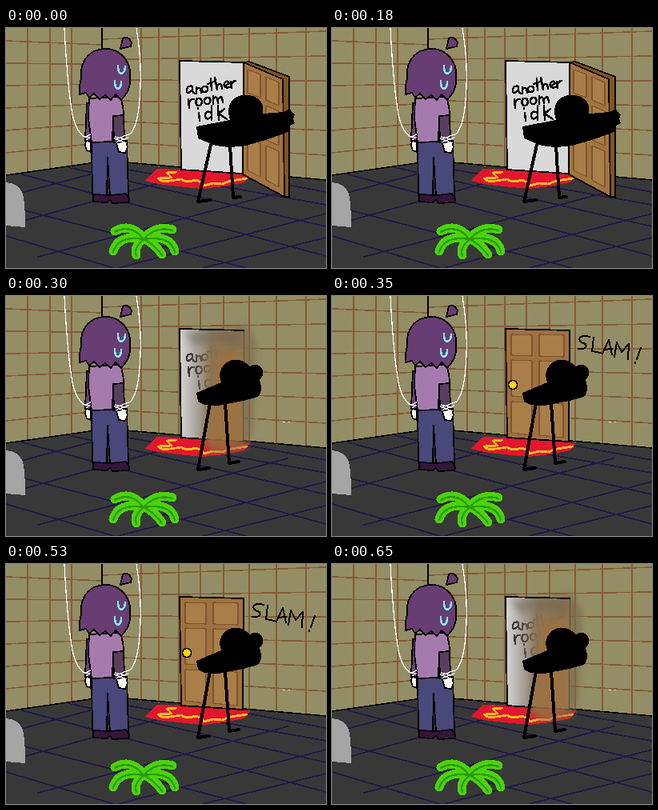
Recreate the animation shown at these times as an HTML page. Size 400 by 300 pixels, loop 700 ms.

```html
<!DOCTYPE html>
<html lang="en">
<head>
<meta charset="utf-8">
<title>Slam</title>
<style>
html, body { margin: 0; width: 100%; height: 100%; overflow: hidden; background: #383838; }
svg { display: block; width: 400px; height: 300px; }
path, ellipse { stroke-linecap: round; stroke-linejoin: round; }
.ink { fill: none; stroke: #000; stroke-width: 2; }
.edge { stroke: #000; stroke-width: 1.8; }
.rope { fill: none; stroke: #fff; stroke-width: 1.3; }
.panel { fill: #a97e49; stroke: #7d552d; stroke-width: 1.2; }
.leg { fill: none; stroke: #000; stroke-width: 4; }
</style>
</head>
<body>
<svg viewBox="0 0 400 300" shape-rendering="crispEdges">
  <defs>
    <linearGradient id="sweep">
      <stop offset="0" stop-color="#8b8780" stop-opacity="0"/>
      <stop offset=".25" stop-color="#817667" stop-opacity=".5"/>
      <stop offset=".5" stop-color="#8a7352" stop-opacity=".9"/>
      <stop offset="1" stop-color="#957348" stop-opacity=".9"/>
    </linearGradient>
    <filter id="soft" x="-30%" y="-30%" width="160%" height="160%"><feGaussianBlur stdDeviation="4"/></filter>
    <g id="words" class="ink" style="stroke-width:2.4" role="img" aria-label="another room idk">
      <path d="M233 73Q226 71 226 79Q227 84 233 77V74Q232 80 236 82M238 74V82M238 77Q243 71 244 81M249 73C243 72 244 82 249 80C254 78 253 72 248 73M256 63L257 78M252 70L260 67M261 62L264 77M264 72Q269 66 270 76M273 73L279 69Q277 64 273 69Q271 76 280 74M281 67L282 75M282 70Q284 66 287 66"/>
      <path d="M228 89L229 100M229 93Q231 88 235 89M241 88C235 88 237 99 242 97C247 94 245 87 240 88M252 87C246 87 247 97 253 95C257 92 256 86 251 87M259 85V95M259 89Q264 82 265 94M265 89Q270 82 271 93"/>
      <path d="M241 106L242 116M240 100V101M257 97V115M257 106Q249 102 249 110Q251 117 257 110M265 97L266 115M273 101L266 107L276 114"/>
    </g>
    <path id="opening" d="M217 41L297 43L296 182L219 177Z"/>
    <g id="bird">
      <path d="M238 121L269 108Q264 95 273 85Q284 76 297 82Q303 86 305 88Q314 83 320 90Q324 98 317 105Q322 119 315 126L297 131L265 137L248 136L240 132Z"/>
      <path class="leg" d="M255 134L240 217L254 215M274 134L279 209L291 207"/>
    </g>
    <path id="specks" d="M346 157H349M353 157H355" fill="none" stroke="#f4eccb"/>
    <path id="leaves" fill="none" d="M172 263Q156 243 136 254M172 263Q140 258 134 279M172 263Q159 274 163 284M172 263Q186 270 195 283M172 263Q206 258 211 279M172 263Q187 246 208 252"/>
  </defs>

  <path fill="#938e65" d="M0 0H400V190L152 168L105 169L0 184Z"/>
  <path id="tiles" fill="none" stroke="#865a35" stroke-width="1.6"/>
  <path fill="none" stroke="#211849" stroke-width="1.8" d="M0 211L105 183M0 247L205 190M40 286L178 250L352 203M140 300L400 232M246 300L400 262M20 183L400 285M0 222L300 300M0 260L135 300M78 174L400 248M152 177L400 221M270 181L400 205"/>
  <path class="ink" style="stroke-width:1.6" d="M120 0V29M0 184L105 169M150 168L400 190"/>

  <path fill="#a5a5a5" d="M0 193Q15 194 20 205Q24 214 24 249L0 247Z"/>
  <path fill="#e3162e" d="M188 176L220 177L305 184L298 193L272 198L245 201L215 198L190 195L174 191Z"/>
  <path fill="none" stroke="#efbd20" stroke-width="2.8" d="M213 180L201 181L207 187L190 188Q194 193 205 191L219 189Q225 194 237 190Q243 191 247 197L259 194L270 195L281 191L301 188"/>

  <g id="plant">
    <use href="#leaves" stroke="#4bd30a" stroke-width="11"/>
    <use href="#leaves" y="1" stroke="#2c9b0b" stroke-width="2.4"/>
  </g>

  <g id="person">
    <path class="edge" fill="#674371" d="M101 94L106 93L106 139L101 148L99 140Z"/>
    <path class="edge" fill="#4a477a" d="M107 141L151 141L153 209L130 210L127 162L126 210L108 208Z"/>
    <path class="edge" fill="#351638" d="M109 208L131 209L150 207Q156 214 153 218L133 219L130 215L126 218L109 217Z"/>
    <path class="edge" fill="#a57bad" d="M104 88L143 86Q147 99 147 109L134 110L133 142L107 143L103 113Z"/>
    <path class="edge" fill="#57405f" d="M134 110L147 109L148 139L135 143Z"/>
    <path class="edge" fill="#fff7e8" d="M100 140L106 143L106 155L101 153L99 147ZM138 144L148 141Q155 148 149 156L141 155Z"/>
    <path class="edge" fill="#683d73" d="M92 83Q91 73 94 63Q92 39 110 29Q131 21 145 34Q157 45 155 64Q156 78 144 90L137 83L131 90L124 84L117 89L110 82L104 87L100 81Z"/>
    <path class="edge" fill="#683d73" d="M143 26L146 13Q152 9 157 18L156 23Z"/>
    <path fill="none" stroke="#86e5f4" stroke-width="2.6" d="M140 47Q140 57 144 57Q149 56 149 48M136 66Q136 76 140 76Q144 75 144 67"/>
    <path class="rope" d="M73 0Q76 62 82 102Q86 128 98 136L105 137M163 0Q171 48 167 89Q165 120 156 132L137 139M99 136L106 133M100 140L106 136M135 138L151 144M137 143L153 137M136 136L149 139"/>
  </g>

  <g id="open">
    <use href="#opening" class="edge" fill="#d9d9d9"/>
    <use href="#words"/>
    <path class="edge" fill="#a37440" d="M297 43L346 64L348 211L296 183Z"/>
    <path class="edge" fill="#805525" d="M297 43L304 42L354 61L354 211L348 211L346 64Z"/>
    <path class="panel" d="M302 52L318 58V87L302 81ZM325 61L341 68V97L325 90ZM302 88L318 94V137L302 131ZM325 97L341 104V147L325 140ZM302 138L318 144V186L302 178ZM325 147L341 154V199L325 190Z"/>
    <path d="M238 123L280 115Q275 100 283 90Q292 82 304 84Q317 86 321 97L321 107L347 105L355 101L357 105L361 108L359 114L361 119L355 122L355 129L328 139L300 147Q276 151 259 146L240 138Z"/>
    <path class="leg" d="M256 146L240 217L256 215M280 147L284 212L293 211"/>
  </g>

  <g id="swing">
    <use href="#opening" class="edge" fill="#d2d2d0"/>
    <use href="#words" opacity=".85"/>
    <path fill="#7d6d4f" opacity=".75" filter="url(#soft)" d="M268 43L300 37L312 57L308 165L299 190L265 196L247 188L252 62Z"/>
    <path fill="url(#sweep)" d="M218 42L297 44L296 181L219 176Z"/>
    <path fill="#6c6354" opacity=".5" filter="url(#soft)" d="M222 45L298 43L294 68L265 56L235 62Z"/>
    <path fill="#a96f36" opacity=".55" filter="url(#soft)" d="M262 76L290 70L292 180L274 195L250 185Z"/>
    <path class="ink" style="stroke-width:1.6" d="M219 177L217 41L297 43"/>
    <use href="#specks"/>
    <use href="#bird"/>
  </g>

  <g id="shut">
    <use href="#opening" class="edge" fill="#a07140"/>
    <path class="panel" d="M224 48L250 49V75L224 74ZM259 48L290 49V76L259 75ZM224 80L250 81V126L224 125ZM259 81L289 82V128L259 127ZM224 132L250 133V174L224 171ZM259 134L289 135V177L259 174Z"/>
    <ellipse class="edge" cx="226" cy="111" rx="5.6" ry="5.6" fill="#ffd500"/>
    <use href="#specks"/>
    <use href="#bird"/>
    <path class="ink" role="img" aria-label="SLAM!" d="M322 51Q311 48 309 54Q310 58 317 60Q320 67 308 66M327 52L325 69L336 71M338 72L346 55L350 73M341 67L350 66M353 76L356 58L362 70L371 60L370 79M386 65L381 79M379 83V84"/>
  </g>
</svg>
<script>
const get = id => document.getElementById(id);

// Tiled wall from x0 to x1; joints run the full height at the given places.
function wall(x0, x1, top0, gap0, top1, gap1, joints) {
  const y = (x, row) => {
    const t = (x - x0) / (x1 - x0);
    return (top0 + gap0 * row) * (1 - t) + (top1 + gap1 * row) * t;
  };
  let d = "";
  for (let row = 0; row < 6; row++) d += `M${x0} ${y(x0, row)}L${x1} ${y(x1, row)}`;
  for (const x of joints) d += `M${x} 0V${y(x, 6)}`;
  return d;
}
const joints = Array.from({ length: 8 }, (_, i) => 169 + 21 * i + 1.2 * i * i);
get("tiles").setAttribute("d",
  wall(0, 120, 16, 28, 21, 24.5, [27, 55, 82]) + wall(120, 400, 14, 25.5, 4, 31, joints));

const scenes = ["open", "swing", "shut"];
function draw() {
  const t = performance.now() % 700;
  const now = t < 300 ? "open" : t >= 350 && t < 650 ? "shut" : "swing";
  for (const id of scenes) get(id).style.display = id === now ? "" : "none";
  requestAnimationFrame(draw);
}
draw();
</script>
</body>
</html>
```
